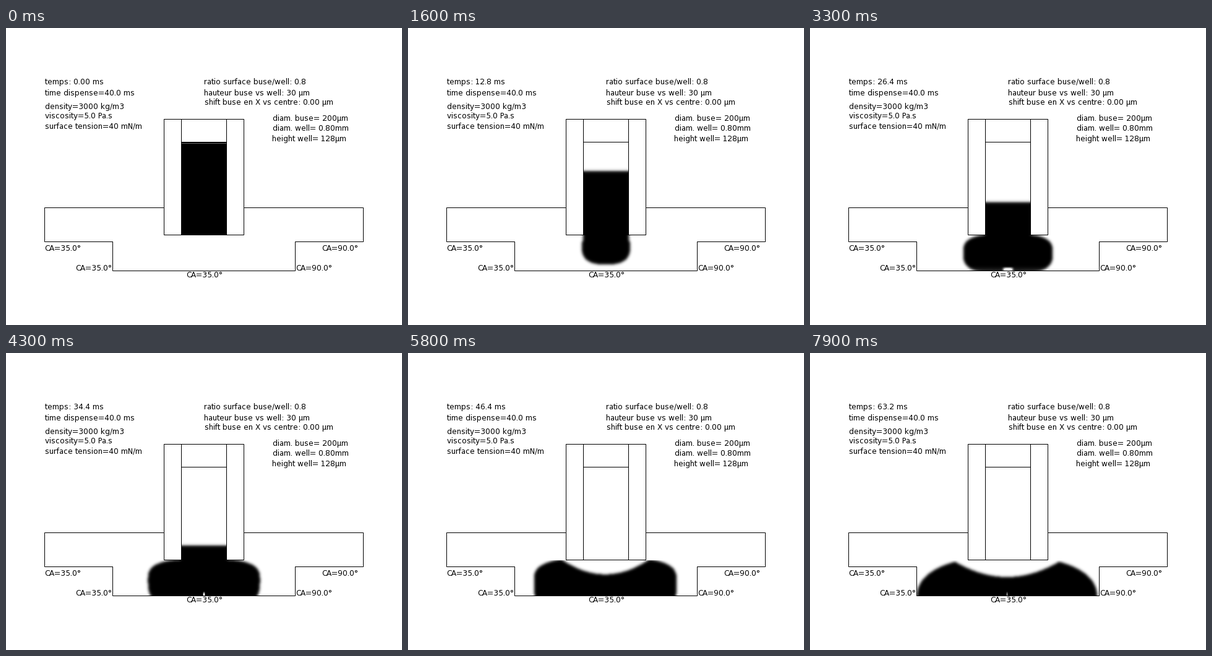
Animation of 640 by 480 pixels, one loop 8000 ms. Source, as a matplotlib script:

```python
import numpy as np
import matplotlib.pyplot as plt
from matplotlib.animation import FuncAnimation

W, H, DPI = 640, 480, 100
STEP, FRAMES = 100, 80
PX = 72 / DPI
# whole-pixel glyph advances
plt.rcParams.update({"font.family": "DejaVu Sans", "text.hinting_factor": 1})

LEFT, RIGHT, TOP, LIP = 283, 356, 184, 334      # nozzle bore
WELL_L, WELL_R, FLOOR = 172, 467, 392
END = 5.0                                       # dispensing stops, s


def ramp(t, a, b):
    return np.clip((t - a) / (b - a), 0, 1)


def blur_matrix(n, sigma=2.3):
    i = np.arange(n)
    k = np.exp(-((i[:, None] - i) / sigma) ** 2 / 2)
    return k / k.sum(axis=1, keepdims=True)


# Pixel centres; the margin around the well keeps the blur clean at its walls
PAD = 14
X = np.arange(WELL_L - PAD, WELL_R + PAD)[None, :] + 0.5
Y = np.arange(LIP + 1 - PAD, FLOOR + PAD)[:, None] + 0.5
BORE_X = np.arange(LEFT, RIGHT + 1)[None, :] + 0.5
BORE_Y = np.arange(TOP, LIP + 1)[:, None] + 0.5
BLUR_X, BLUR_Y = blur_matrix(X.size), blur_matrix(Y.size)


def surface(t, dx):
    """Upper meniscus: sinks steadily, then relaxes into a shallow bowl."""
    if t < END:
        return 183.8 + 29.6 * t - 0.0125 * ramp(t, 4.3, END) * dx**2
    rest = np.exp(-(t - END) / 0.414)
    return 362 - 30 * rest - (0.0035 + 0.009 * rest) * dx**2


def well_liquid(t):
    dx = np.abs(X - 320 + 1.5 * ramp(t, 4.5, 6.3))

    # drop falls towards the floor, spreads sideways, finally slumps
    bottom = 395 - 64 * np.exp(-t)
    slump = ramp(t, 6.3, 7.9)
    mid = bottom - 29.5 + 3 * ramp(t, 3.3, 5.2) + 26 * slump**2 * (3 - 2 * slump)
    bottom += 18 * max(t - 3, 0)
    crown = 332.5 - 4 * ramp(t, 5, 6.3)
    u = max(t - 1.5, 0)
    width = 37 + 20.8 * u - 0.6 * u**2
    power = 2.5 + 0.5 * ramp(t, 0.9, 2.2) - 0.7 * slump

    height = np.where(Y < mid, max(mid - crown, 1), bottom - mid)
    body = (dx / width) ** power + (np.abs(Y - mid) / height) ** power < 1
    neck = (dx < 37) & (Y < mid)
    shape = (body | neck) & (Y > surface(t, dx))
    liquid = BLUR_Y @ shape.astype(float) @ BLUR_X.T

    # air trapped against the floor
    up = np.abs(FLOOR - Y)
    radius = 8 * np.exp((3.3 - t) / 0.6)
    bubble = ramp(t, 2.5, 2.8) * np.exp(-(dx / radius) ** 4 - (up / 5) ** 4)
    haze = 0.12 * ramp(t, 2.5, 3) * ramp(-t, -4.4, -3.4) * np.exp(-(up / 5) ** 2)
    return liquid * (1 - np.clip(bubble + haze, 0, 1))


def bore_liquid(t):
    soft = 0.2 + 1.1 * ramp(t, 0, 0.5)
    depth = (surface(t, BORE_X - 320) - BORE_Y) / soft
    return 1 / (1 + np.exp(np.clip(depth, -50, 50)))


def picture(t):
    out = np.zeros((FLOOR - TOP, WELL_R - WELL_L))
    lip = LIP + 1 - TOP
    out[lip:] = well_liquid(t)[PAD:-PAD, PAD:-PAD]
    out[:lip, LEFT - WELL_L:RIGHT + 1 - WELL_L] = bore_liquid(t)
    return 1 - out


fig = plt.figure(figsize=(W / DPI, H / DPI), dpi=DPI, facecolor="white")
ax = fig.add_axes([0, 0, 1, 1])
ax.axis("off")
image = ax.imshow(picture(0), cmap="gray", vmin=0, vmax=1, aspect="auto",
                  interpolation="nearest",
                  extent=(WELL_L, WELL_R, FLOOR, TOP))
ax.set_xlim(0, W)
ax.set_ylim(H, 0)


def line(*pts, color="black"):
    x, y = np.array(pts).T + 0.5
    return ax.plot(x, y, color=color, lw=PX, snap=False,
                   solid_capstyle="projecting", solid_joinstyle="miter")[0]


def label(x, y, s):
    return ax.text(x, y, s, fontsize=12 * PX, va="baseline", ha="left")


seam = line((LEFT, 186), (RIGHT, 186), color="0.4")
line((255, 290), (62, 290), (62, 345), (WELL_L, 345), (WELL_L, FLOOR),
     (WELL_R, FLOOR), (WELL_R, 345), (577, 345), (577, 290), (384, 290))
line((255, 147), (384, 147), (384, LIP), (255, LIP), (255, 147))
line((LEFT, 147), (LEFT, LIP))
line((RIGHT, 147), (RIGHT, LIP))
line((LEFT, TOP), (RIGHT, TOP))

clock = label(63, 91, "")
for x, y, s in [
    (63, 109, "time dispense=40.0 ms"),
    (63, 131, "density=3000 kg/m3"),
    (63, 146, "viscosity=5.0 Pa.s"),
    (63, 162, "surface tension=40 mN/m"),
    (320, 91, "ratio surface buse/well: 0.8"),
    (320, 109, "hauteur buse vs well: 30 µm"),
    (321, 124, "shift buse en X vs centre: 0.00 µm"),
    (431, 150, "diam. buse= 200µm"),
    (431, 166, "diam. well= 0.80mm"),
    (430, 183, "height well= 128µm"),
    (62, 360, "CA=35.0°"),
    (112, 392, "CA=35.0°"),
    (291, 403, "CA=35.0°"),
    (468, 392, "CA=90.0°"),
    (510, 360, "CA=90.0°"),
]:
    label(x, y, s)


def update(i):
    t = i * STEP / 1000
    ms = 8 * t
    clock.set_text(f"temps: {ms:.{2 if ms < 10 else 1}f} ms")
    image.set_data(picture(t))
    seam.set_visible(i == 0)
    return image, clock, seam


anim = FuncAnimation(fig, update, frames=FRAMES, interval=STEP,
                     repeat=True, repeat_delay=0, blit=False)
plt.show()
```
